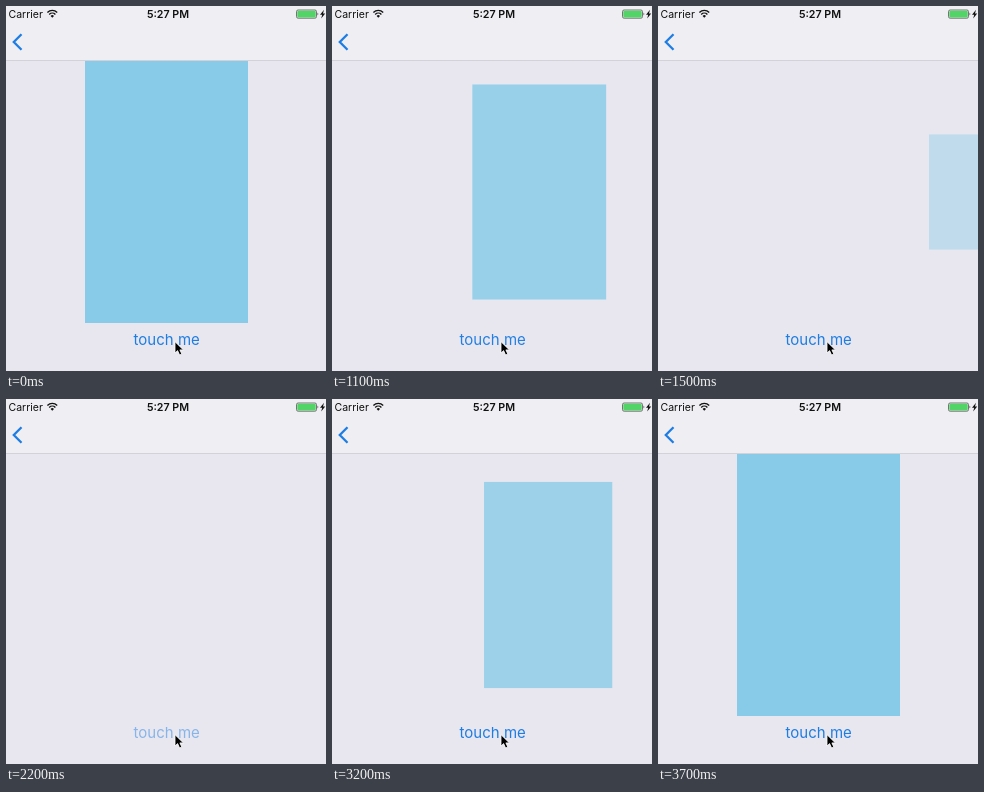
An HTML page for the animation above (4.1 s loop, 320 px wide and 365 px high).

```html
<!DOCTYPE html>
<html lang="en">
<head>
<meta charset="utf-8">
<title>Touch me</title>
<style>
  html, body { margin: 0; width: 100%; height: 100%; overflow: hidden; background: #e8e7ef; }
  svg { display: block; width: 320px; height: 365px; font-family: Inter, Roboto, sans-serif; }
</style>
</head>
<body>
<svg viewBox="0 0 320 365">
  <rect width="320" height="365" fill="#e8e7ef"/>
  <rect id="card" fill="#88cbe8"/>

  <rect width="320" height="54" fill="#efeef3"/>
  <rect y="54" width="320" height="1" fill="#d3d2d8"/>

  <g fill="#111">
    <text x="2.5" y="12" font-size="10.5">Carrier</text>
    <text x="162" y="12" font-size="10.7" font-weight="600" text-anchor="middle">5:27 PM</text>
    <path d="M46.3 11.8 l-1.7 -1.9 a2.4 2.4 0 0 1 3.4 0z"/>
    <path d="M43.2 8.4 a4.4 4.4 0 0 1 6.2 0 M41.4 6.4 a7 7 0 0 1 9.8 0" fill="none" stroke="#111" stroke-width="1.4"/>
    <path d="M311.6 6.4 q1.4 1.6 0 3.2z"/>
    <path d="M318 3.8 l-4 4.9 h2.2 l-1 3.7 l4 -5 h-2.2z"/>
  </g>
  <rect x="290.5" y="4" width="20" height="8.2" rx="1.6" fill="#efeef3" stroke="#555" stroke-width=".8"/>
  <rect x="291.3" y="4.8" width="18.4" height="6.6" rx="1" fill="#52d566"/>

  <path d="M15.5 28.3 L7.8 36 L15.5 43.7" fill="none" stroke="#1d7de3" stroke-width="2.3"/>

  <text id="button" x="160.7" y="339" font-size="15" text-anchor="middle" fill="#1d7de3">touch me</text>
  <path d="M169 335.7 V347 L171.6 344.6 L173.6 349 L175.8 348 L173.9 343.9 H177.4Z" fill="#000" stroke="#fff" stroke-width=".8"/>
</svg>
<script>
  const LOOP = 4100, STEP = 100, MOVE = 1535;
  const card = document.getElementById('card');
  const button = document.getElementById('button');

  const clamp = u => Math.min(1, Math.max(0, u));
  const ease = u => (1 - Math.cos(Math.PI * clamp(u))) / 2;
  const set = (node, attrs) => {
    for (const name in attrs) node.setAttribute(name, attrs[name]);
  };

  function draw(t) {
    // The card shrinks, fades and slides right, then returns.
    const away = ease((t - 673) / MOVE) - ease((t - 2134) / MOVE);
    const scale = 1 - away;
    const width = 163 * scale, height = 262 * scale;
    set(card, {
      x: 160.5 + 261 * away - width / 2,
      y: 186 - height / 2,
      width, height,
      opacity: scale
    });

    // Each press dims the label at once; it then fades back in.
    const sincePress = t < 700 ? Infinity : t < 2000 ? t - 700 : t - 2000;
    set(button, { opacity: 0.24 + 0.76 * ease((sincePress - 50) / 400) });
  }

  function tick() {
    const t = performance.now() % LOOP;
    draw(Math.floor(t / STEP) * STEP);
    requestAnimationFrame(tick);
  }
  tick();
</script>
</body>
</html>
```
